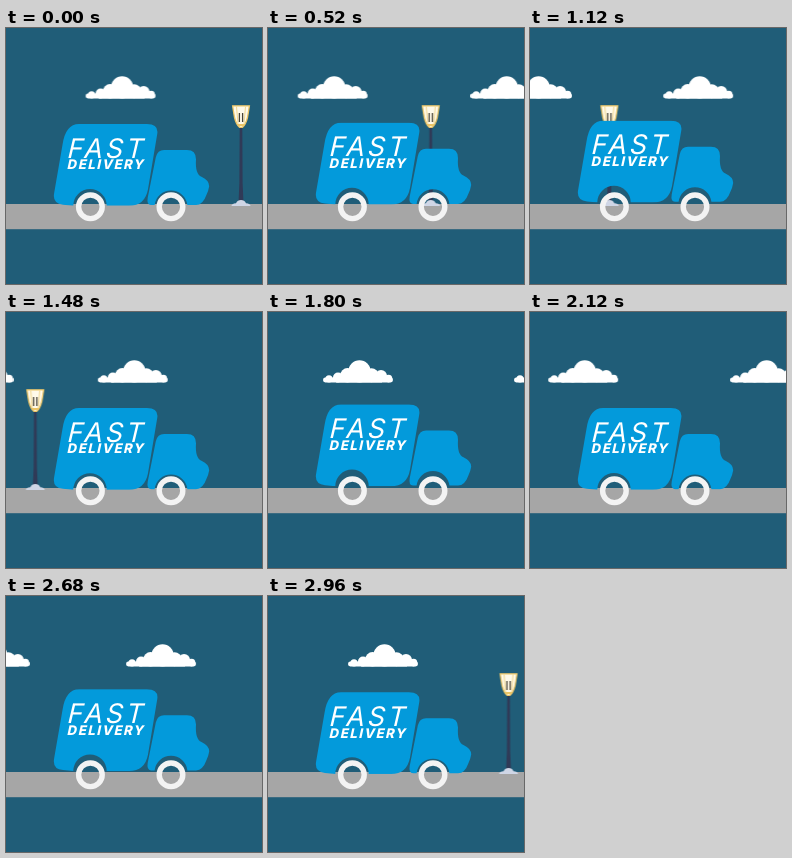
Write an HTML page that moves like this. It is 256x256 px and loops after 3 s.

```html
<!DOCTYPE html>
<html lang="en">
<head>
<meta charset="utf-8">
<title>Fast delivery</title>
<style>
  html, body { margin: 0; width: 100%; height: 100%; overflow: hidden; background: #205d78; }
  svg { display: block; width: 100vw; height: 100vh; }

  /* The scene moves in 40 ms ticks: 75 per loop. */
  .lamp, .cloud { animation: 3s steps(75) -3ms infinite; }
  .lamp { animation-name: lamp; animation-timing-function: steps(47); }
  .far { animation-name: far; }
  .near { animation-name: near; }

  /* The body rocks on its wheels, four times per loop. */
  .body { animation: rock 375ms cubic-bezier(.37, 0, .63, 1) -67ms infinite alternate; }

  @keyframes lamp {
    0% { transform: translateX(235px); }
    62.667% { transform: translateX(-26.3px); animation-timing-function: step-end; }
    62.668% { transform: translateX(390.7px); animation-timing-function: steps(28); }
    100% { transform: translateX(235px); }
  }

  @keyframes far {
    from { transform: translateX(297px); }
    to { transform: translateX(-48px); }
  }

  /* Leaves slowly on the left, then comes back faster from the right. */
  @keyframes near {
    0% { transform: translateX(114.6px); animation-timing-function: steps(40); }
    53.333% { transform: translateX(-39px); animation-timing-function: step-end; }
    57.333% { transform: translateX(292.4px); animation-timing-function: steps(31); }
    98.667%, 100% { transform: translateX(115px); animation-timing-function: step-end; }
  }

  @keyframes rock {
    from { transform: translateY(0); }
    to { transform: translateY(-3.8px); }
  }

  text { font-family: Inter, Lato, sans-serif; font-style: italic; fill: #fff; }
  .fast { font-size: 27px; font-weight: 400; letter-spacing: 3.1px; }
  .delivery { font-size: 13.3px; font-weight: 800; letter-spacing: 1.5px; }
</style>
</head>
<body>
<svg viewBox="0 0 256 256">
  <defs>
    <g id="cloud" fill="#fff">
      <rect x="-35" y="65.6" width="70" height="4.9" rx="2.4"/>
      <circle cx="-29" cy="66.8" r="3.6"/>
      <circle cx="-20" cy="65.5" r="5"/>
      <circle cx="-10.5" cy="63.3" r="7.2"/>
      <circle cx="1.5" cy="59.4" r="11.1"/>
      <circle cx="13.5" cy="63.2" r="7"/>
      <circle cx="23" cy="64" r="6"/>
      <circle cx="30.5" cy="66.6" r="3.8"/>
      <rect x="-22" y="63" width="46" height="7.5"/>
    </g>
    <circle id="wheel" r="11.8" fill="none" stroke="#f3f3f3" stroke-width="5.4"/>
  </defs>

  <rect width="256" height="256" fill="#205d78"/>
  <rect y="176" width="256" height="25.2" fill="#a6a6a6"/>

  <g class="cloud far"><use href="#cloud"/></g>
  <g class="cloud near"><use href="#cloud"/></g>

  <g class="lamp">
    <path d="M-1.3 99H1.3L1.6 155L2.4 173H-2.4L-1.6 155Z" fill="#303a57"/>
    <path d="M-9.5 178Q-9.5 175.6-5 175.2Q-3.5 172 0 172Q3.5 172 5 175.2Q9.5 175.6 9.5 178Z" fill="#cfd6e6"/>
    <path d="M-8.4 77.8H8.4L6.6 89Q5 96 1.5 99.3H-1.5Q-5 96-6.6 89Z" fill="#fffaea" stroke="#ecc566" stroke-width="1.3"/>
    <path d="M-4.5 78.5L-3 96M4.5 78.5L3 96" stroke="#f3d88f" stroke-width="1"/>
    <path d="M-1.6 85V94M1.6 85V94" stroke="#4a4436" stroke-width="1.3"/>
    <path d="M-3 97H3" stroke="#ecc566" stroke-width="2"/>
  </g>

  <g class="body">
    <g fill="#039adb">
      <path d="M73 96.2H141Q153 96.2 151.2 106.5L142 161.5Q139 178 123 178H100.7A16.5 16.5 0 0 0 67.3 178L57 177Q46 176 48.2 165L56.5 117Q59.5 96.2 73 96.2Z"/>
      <path d="M158 122.2H181Q190 122.2 190 131.5Q189 146.5 195.5 149Q203.2 152.5 203.2 158.5Q202.5 163 200.3 167.5Q197 177 190 177.4H181.4A16.5 16.5 0 0 0 148.6 177.4H145Q140.5 177 141.7 170L149.8 129.5Q151.5 122.2 158 122.2Z"/>
    </g>
    <text class="fast" transform="translate(61.3 129.8) skewX(-4)">FAST</text>
    <text class="delivery" transform="translate(61.3 141.6) skewX(-3)">DELIVERY</text>
  </g>
  <use href="#wheel" x="84.4" y="178.8"/>
  <use href="#wheel" x="165" y="178.8"/>
</svg>
</body>
</html>
```
